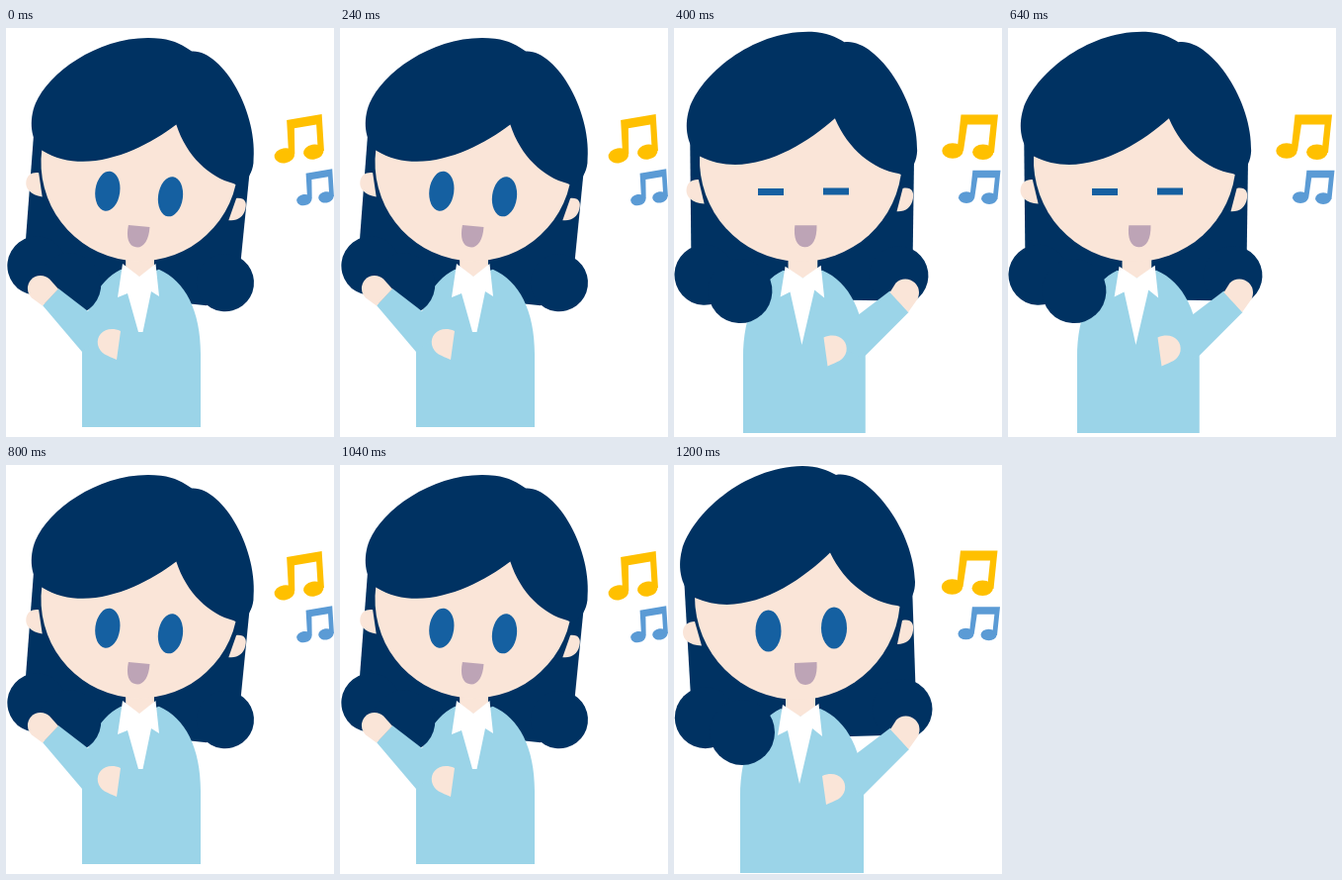
Recreate the animation shown at these times as an HTML page. Size 332 by 413 pixels, loop 1.6 s.

```html
<!DOCTYPE html>
<html lang="en">
<head>
<meta charset="utf-8">
<title>Waving singer</title>
<style>
  html, body { margin: 0; width: 100%; height: 100%; overflow: hidden; background: #fff; }
  svg { display: block; width: 100%; height: 100%; }
  .hair { fill: #003262; }
  .skin { fill: #fae5d8; }
  .shirt { fill: #9bd4e8; }
  .collar { fill: #fff; }
  .eye { fill: #1560a1; }
  .mouth { fill: #bda4b6; }
</style>
</head>
<body>
<svg id="stage" viewBox="0 0 332 413"></svg>
<script>
const STEP = 400;

// Moves the anchor point onto (x, y), turned and scaled around it.
const place = (anchorX, anchorY, x, y, scale = 1, angle = 0) =>
  `translate(${x} ${y}) rotate(${angle}) scale(${scale}) translate(${-anchorX} ${-anchorY})`;
const head = (...to) => place(128.5, 165.5, ...to);
const body = (...to) => place(67, 412, ...to);
const note = (...to) => place(300, 110, ...to);

const group = (transform, content) => `<g transform="${transform}">${content}</g>`;
const path = (cls, d) => `<path class="${cls}" d="${d}"/>`;
const oval = (cls, x, y, rx, ry = rx) =>
  `<ellipse class="${cls}" cx="${x}" cy="${y}" rx="${rx}" ry="${ry}"/>`;

const backHair =
  path('hair', 'M10 112L17 235L40 274H180L215 273L244.5 225L241 120Z') +
  oval('hair', 231.2, 246.6, 30.3);
const torso =
  '<rect class="skin" x="113" y="225" width="30" height="35"/>' +
  path('shirt', 'M67 412V335C67 290 83 258 108 246L128 254L148 246C176 258 192 290 192 335V412Z');
const leftCurls = oval('hair', 31.8, 255.2, 31) + oval('hair', 69, 270, 33);
const face =
  oval('skin', 125, 133, 104) +
  path('skin', 'M28 182.5C15 182 9 176 9 169C9 162 14 158 21 158Z') +
  path('skin', 'M231 157C240 155 243 160 242 167C241 176 235 181 226 181Z') +
  path('mouth', 'M122 200L144.5 199C145.5 213 141 222 133 222C125 222 121 213 122 200Z') +
  path('hair', 'M21 134C8 125 3 105 8 86C18 50 70 2 130 1C145 1 155 5 164 10' +
    'C196 4 243 65 244 118C244 128 241 136 232 144L226 142C200 139 173 120 158 88.6C125 121 70 156 21 134Z');
const openEyes = oval('eye', 95.5, 167.5, 13, 21) + oval('eye', 162, 164.5, 13, 21);
const closedEyes = path('eye', 'M85 162H111V169H85ZM151 161.5H177V168.5H151Z');

const collar = path('collar',
  'M110 242L105 273L115 268L127 322L140 266L150 274L146.5 241L128 254Z');
const shortCollar = path('collar',
  'M118 238L113 272L123 268L134 307H138.5L147 266L155 271L151.5 238L135 251Z');

const restingHand = path('skin', 'M150 314C164 308 175 317 173 328C171 337 163 339 154 343Z');
const raisedRightArm =
  path('shirt', 'M219 265.5L184 292L165 320L191 334L238 287Z') +
  path('skin', 'M219 267L225 257.5A13.8 13.8 0 0 1 245 276.5L237.5 287Z');
const raisedLeftArm =
  path('shirt', 'M53 263L83 286L100 310L77 327L37 280Z') +
  path('skin', 'M53 263.5L44 253.5A13 13 0 0 0 26 272.5L37 280.5Z');

const notes =
  '<path d="M290.5 87.5H328L324 126H317.5L320.5 97.5H297L293 124H286.5Z"/>' +
  oval('', 282, 124, 10.7, 7.8) + oval('', 312.8, 125.3, 10.7, 7.8);

const drawPose = pose =>
  group(pose.head, backHair) +
  group(pose.body, torso) +
  (pose.collar || group(pose.body, collar)) +
  group(pose.head, leftCurls) +
  pose.arms +
  group(pose.head, face) +
  pose.eyes +
  `<g fill="#ffc000">${group(pose.yellow, notes)}</g>` +
  `<g fill="#5b9bd5">${group(pose.blue, notes)}</g>`;

const tilted = head(134.5, 167, 0.96, 7.6);
const upright = head(128.5, 165.5);

const waveLeft = drawPose({
  head: tilted,
  body: body(77, 403, 0.96),
  collar: shortCollar,
  arms: raisedLeftArm + group('translate(266 -8) scale(-1 1)', restingHand),
  eyes: group(tilted, openEyes),
  yellow: note(296.7, 112.7, 0.96, -9.5),
  blue: note(313, 161.5, 0.72, -9.5)
});
const singing = drawPose({
  head: head(130.3, 165.5, 0.985, 2.7),
  body: body(70, 409, 0.99),
  arms: group('translate(-0.5 0)', raisedRightArm) + group('translate(1.5 -1.5)', restingHand),
  eyes: closedEyes,
  yellow: note(300, 110),
  blue: note(309.5, 160.7, 0.75)
});
const waveRight = drawPose({
  head: upright,
  body: body(67, 412),
  arms: raisedRightArm + restingHand,
  eyes: group(upright, openEyes),
  yellow: note(299.5, 109),
  blue: note(309, 160, 0.75)
});

const sequence = [waveLeft, singing, waveLeft, waveRight];
const stage = document.getElementById('stage');
let shown = -1;

function render() {
  const index = Math.floor(performance.now() / STEP) % sequence.length;
  if (index !== shown) {
    stage.innerHTML = sequence[index];
    shown = index;
  }
  requestAnimationFrame(render);
}
render();
</script>
</body>
</html>
```
